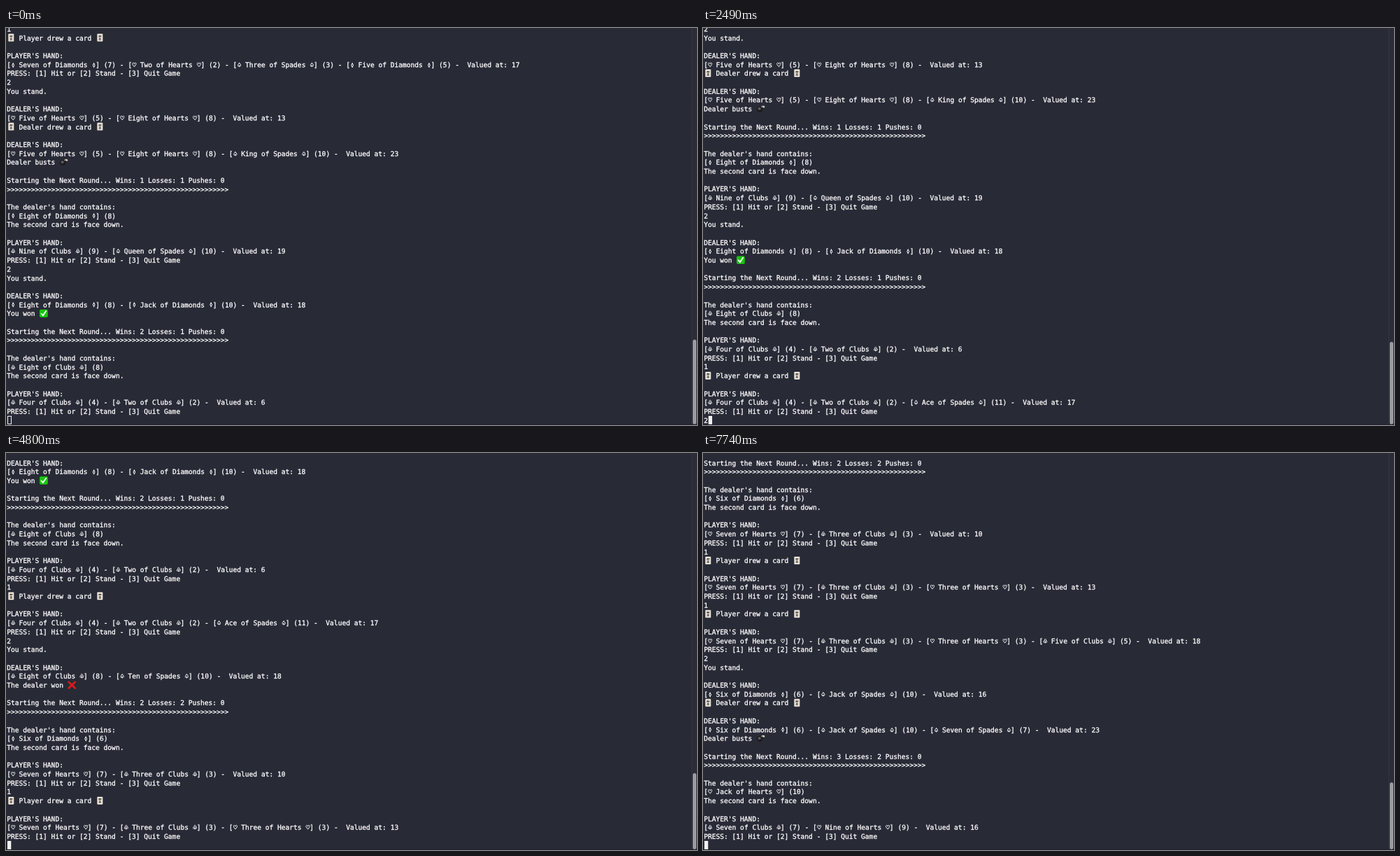
An HTML page that plays this animation: 988 by 567 pixels, repeating every 8000 ms.

```html
<!DOCTYPE html>
<html lang="en">
<head>
<meta charset="utf-8">
<title>Blackjack terminal</title>
<style>
  html, body { margin: 0; width: 100%; height: 100%; overflow: hidden; background: #282a36; }
  svg { display: block; }
  text {
    font: 9.59px "DejaVu Sans Mono", monospace;
    white-space: pre;
    text-rendering: geometricPrecision;
    fill: #fff;
    stroke: #fff;
    stroke-width: .3px;
  }
  .suit { text-anchor: middle; stroke-width: .45px; }
  .small { font-size: 6.4px; }
</style>
</head>
<body>
<svg width="988" height="567" viewBox="0 0 988 567">
  <defs>
    <g id="joker">
      <rect x="2.1" y="-9.3" width="8" height="11" rx=".8" fill="#ece5d8"/>
      <path d="M3.8-5.4 5.2-7.4 6.2-6.6 8.2-7 8-5 4.4-4.8Z" fill="#4a4642"/>
      <path d="M4.4-3.8H7.8L7.2-1.8 8.2-.2H3.8L4.9-1.8Z" fill="#77706a"/>
    </g>
    <g id="check">
      <rect x=".6" y="-9.4" width="11.8" height="11.4" rx="2" fill="#16c60c"/>
      <path d="M3.2-3.4 5.5-.7 9.8-7" fill="none" stroke="#fff" stroke-width="1.8" stroke-linecap="round"/>
    </g>
    <g id="cross">
      <path d="M1.9-8 10.9.7M10.9-8 1.9.7" fill="none" stroke="#dd1c1a" stroke-width="2.7" stroke-linecap="round"/>
    </g>
    <g id="bomb">
      <circle cx="5" cy="-3" r="4.2" fill="#1d1d1e"/>
      <circle cx="4.4" cy="-3.9" r="2" fill="#5c5c5e"/>
      <path d="M7.4-6Q8.8-8.4 10.4-7.2" fill="none" stroke="#a8a49a" stroke-width="1.6"/>
      <circle cx="10.6" cy="-6.6" r="1.4" fill="#e4d8bd"/>
    </g>
  </defs>
  <rect width="988" height="567" fill="#282a36"/>
  <rect x="980" width="8" height="567" fill="#2b2c37"/>
  <rect x="980" width="1" height="567" fill="#32343f"/>
  <g id="log"></g>
  <rect id="cursor" stroke="#f4f4f4"/>
  <rect id="thumb" x="982" width="5" rx="2.5" fill="#9b9ca1"/>
  <rect y="566" width="988" height="1" fill="#1e1f29"/>
</svg>
<script>
const NS = 'http://www.w3.org/2000/svg';
const $ = id => document.getElementById(id);
const CELL = 5.775, ROW = 12.7, LEFT = 1.2, BASE = 4.9, LAST = 44, LOOP = 8000;

const SUITS = { H: ['♡', 'Hearts'], S: ['♤', 'Spades'], C: ['♧', 'Clubs'], D: ['◊', 'Diamonds'] };
const RANKS = {
  2: 'Two', 3: 'Three', 4: 'Four', 5: 'Five', 6: 'Six', 7: 'Seven', 8: 'Eight', 9: 'Nine',
  T: 'Ten', J: 'Jack', Q: 'Queen', K: 'King', A: 'Ace'
};
const ICONS = { '🃏': 'joker', '✅': 'check', '❌': 'cross', '💣': 'bomb' };

const worth = c => c[0] === 'A' ? 11 : +c[0] || 10;
const card = c => {
  const [sign, suit] = SUITS[c[1]];
  return `[${sign} ${RANKS[c[0]]} of ${suit} ${sign}] (${worth(c)})`;
};
const hand = list => {
  const cards = list.split(' ');
  const sum = cards.reduce((n, c) => n + worth(c), 0);
  return cards.map(c => card(c) + ' - ').join('') + ' Valued at: ' + sum;
};

const lines = [];
const say = (...rows) => lines.push(...rows);
const ask = (cards, key) =>
  say('', "PLAYER'S HAND:", hand(cards), 'PRESS: [1] Hit or [2] Stand - [3] Quit Game', key);
const drew = who => say(`🃏 ${who} drew a card 🃏`);
const dealer = cards => say('', "DEALER'S HAND:", hand(cards));
const stand = cards => { say('You stand.'); dealer(cards); };
const next = (result, wins, losses, up) => say(
  result, '', `Starting the Next Round... Wins: ${wins} Losses: ${losses} Pushes: 0`, '>'.repeat(55), '',
  "The dealer's hand contains:", card(up), 'The second card is face down.');

say('1');
drew('Player');
ask('7D 2H 3S 5D', '2');
stand('5H 8H');
drew('Dealer');
dealer('5H 8H KS');
next('Dealer busts 💣', 1, 1, '8D');
ask('9C QS', '2');
stand('8D JD');
next('You won ✅', 2, 1, '8C');
ask('4C 2C', '1');
drew('Player');
ask('4C 2C AS', '2');
stand('8C TS');
next('The dealer won ❌', 2, 2, '6D');
ask('7H 3C', '1');
drew('Player');
ask('7H 3C 3H', '1');
drew('Player');
ask('7H 3C 3H 5C', '2');
stand('6D JS');
drew('Dealer');
dealer('6D JS 7S');
next('Dealer busts 💣', 3, 2, 'JH');
ask('7C 9H', '');

function set(el, attrs) {
  for (const k in attrs) el.setAttribute(k, attrs[k]);
}

function add(parent, tag, attrs, body = '') {
  const el = document.createElementNS(NS, tag);
  set(el, attrs);
  el.textContent = body;
  return parent.appendChild(el);
}

// Each run starts on its own column, so wide signs never shift the rest.
const rows = lines.map((line, i) => {
  const g = add($('log'), 'g', {});
  const y = BASE + i * ROW;
  let col = 0;
  for (const run of line.split(/([♡♤♧◊🃏✅❌💣])/u)) {
    const x = LEFT + col * CELL;
    if (ICONS[run]) {
      add(g, 'use', { href: '#' + ICONS[run], x, y });
      col += 2;
    } else if (/^[♡♤♧◊]$/.test(run)) {
      const small = run === '◊';
      add(g, 'text', {
        class: small ? 'suit small' : 'suit',
        x: x + CELL / 2 + 0.3, y: y - (small ? 1.2 : 0)
      }, run);
      col++;
    } else if (run) {
      add(g, 'text', { x, y }, run);
      col += run.length;
    }
  }
  return g;
});

// time, lines scrolled, key typed, lines counted by the scrollbar
const steps = [
  [0, 0, 0, 0], [1080, 0, 1, 0],
  [1500, 6, 0, 1], [1530, 6, 0, 6], [2490, 6, 1, 6],
  [2760, 23, 0, 23], [4470, 23, 1, 23],
  [4800, 29, 0, 24], [4830, 29, 0, 29], [5670, 29, 1, 29],
  [6000, 35, 0, 35], [7080, 35, 1, 35],
  [7740, 56, 0, 56]
];

function draw(t) {
  const [, top, typed, counted] = steps.filter(s => s[0] <= t).pop();
  const end = top + LAST + typed;
  rows.forEach((g, i) => g.setAttribute('display', i >= top && i < end ? 'inline' : 'none'));
  set($('log'), { transform: `translate(0 ${-top * ROW})` });

  const focused = t >= 750;
  set($('cursor'), {
    x: 2 + typed * CELL + (focused ? 0 : 0.5), y: focused ? 554 : 554.5,
    width: focused ? 5.3 : 5, height: focused ? 12 : 11,
    fill: focused ? '#f4f4f4' : 'none', 'stroke-width': focused ? 0 : 1
  });

  const size = 121 * 211 / (211 + counted);
  set($('thumb'), { y: 566 - size, height: size });
}

const start = performance.now();
function tick() {
  draw((performance.now() - start) % LOOP);
  requestAnimationFrame(tick);
}
tick();
</script>
</body>
</html>
```
